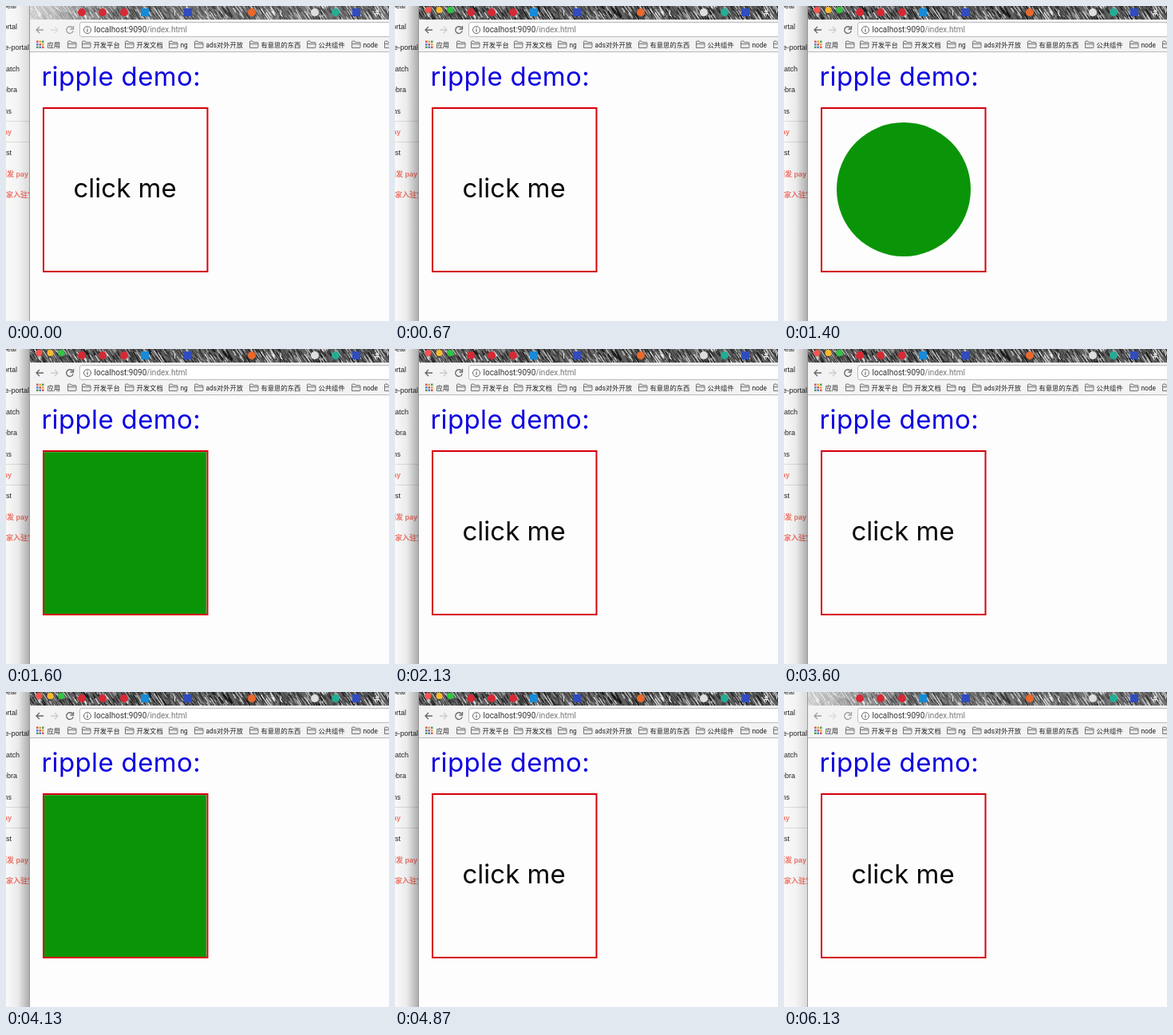
An HTML page for the animation above (6.27 s loop, 480x395 px).

```html
<!DOCTYPE html>
<html lang="zh">
<head>
<meta charset="utf-8">
<title>ripple demo</title>
<style>
html, body { margin: 0; width: 100%; height: 100%; overflow: hidden; background: #fdfdfd; }
svg { display: block; width: 480px; height: 395px; }
text { font-family: Roboto, "Noto Sans CJK SC", "Noto Sans CJK", sans-serif; white-space: pre; }
.side text { font: 9px "Liberation Sans", "Noto Sans CJK SC", "Noto Sans CJK", sans-serif; fill: #222; }
.side .hot { fill: #f2776b; font-weight: 700; }
.url { font-size: 10px; fill: #333; }
.marks text { font-size: 8.3px; fill: #222; }
.big { font: 400 33px Inter, Lato, sans-serif; }
.big.title { letter-spacing: .35px; fill: #1004e0; }
.big.label { fill: #0a0a0a; }
</style>
</head>
<body>
<svg viewBox="0 0 480 395" xmlns="http://www.w3.org/2000/svg">
  <defs>
    <linearGradient id="shade">
      <stop offset="0" stop-color="#000" stop-opacity="0"/>
      <stop offset=".5" stop-color="#000" stop-opacity=".06"/>
      <stop offset="1" stop-color="#000" stop-opacity=".32"/>
    </linearGradient>
    <linearGradient id="fade">
      <stop offset="0" stop-color="#fff" stop-opacity=".75"/>
      <stop offset=".12" stop-color="#fff" stop-opacity=".45"/>
      <stop offset=".25" stop-color="#fff" stop-opacity=".15"/>
      <stop offset="1" stop-color="#fff" stop-opacity=".12"/>
    </linearGradient>
    <clipPath id="strip"><path d="M30 0H480V17H30Z"/></clipPath>
    <clipPath id="inner"><path d="M48 129H251.500V332H48Z"/></clipPath>
    <g id="folder" fill="none" stroke="#777">
      <path d="M.5 9V1.500Q.5 .5 1.500 .5H4L5 2H10Q11 2 11 3V8Q11 9 10 9Z" fill="#e6e6e6"/>
      <path d="M.5 4H11"/>
    </g>
  </defs>

  <rect width="30" height="395" fill="#f9f9f9"/>
  <path d="M0 144.500H30M0 170.500H30" stroke="#ddd"/>
  <g class="side" id="side"></g>
  <rect id="shadow" width="30" height="395" fill="url(#shade)"/>

  <rect x="30" width="450" height="395" fill="#fdfdfd"/>
  <g clip-path="url(#strip)">
    <rect x="30" width="450" height="17" fill="#606060"/>
    <g id="streaks" fill="none"></g>
    <rect id="haze" x="30" width="450" height="17" fill="url(#fade)"/>
    <g id="icons"></g>
    <text x="462" y="12" font-size="10" font-weight="700" fill="#eee">#</text>
    <path d="M211.500 5V12M344.500 5V12M478.500 5V9" stroke="#ddd"/>
  </g>
  <g id="lights">
    <circle cx="41.500" cy="5" r="4" fill="#f8544d"/>
    <circle cx="55.500" cy="5" r="4" fill="#f8b92f"/>
    <circle cx="69.500" cy="5" r="4" fill="#2fc641"/>
  </g>

  <rect x="30" y="17" width="450" height="41" fill="#f3f3f3"/>
  <path d="M30 57.500H480" stroke="#b9b9b9"/>
  <path d="M29.500 0V395" stroke="#999"/>
  <g id="nav" fill="none" stroke="#666" stroke-width="1.300">
    <path d="M47 30H38M42 26L38 30L42 34"/>
    <path d="M56 30H65M61 26L65 30L61 34" stroke="#ccc"/>
    <path d="M83.500 27.500A4.300 4.300 0 1 0 84.200 31.200M84.500 25V29H80.500"/>
  </g>
  <rect x="92.500" y="20.500" width="400" height="18" rx="2.500" fill="#fff" stroke="#bbb"/>
  <circle cx="102" cy="30" r="4.500" fill="none" stroke="#666"/>
  <path d="M102 29V32.500M102 27V28" stroke="#666" stroke-width="1.200"/>
  <text class="url" x="110.500" y="33">localhost:9090<tspan fill="#777">/index.html</tspan></text>
  <g class="marks" id="marks"></g>

  <text class="big title" x="44.500" y="100">ripple demo:</text>
  <text class="big label" x="84.500" y="240">click me</text>
  <g clip-path="url(#inner)"><circle id="ripple" cx="150" cy="230" fill="#0a9508"/></g>
  <rect x="47" y="128" width="205.500" height="205" fill="none" stroke="#d6000c" stroke-width="2"/>
  <path id="edge" d="M48 129.500H251V332" fill="none" stroke="#fff" stroke-opacity=".4" stroke-dasharray="1 1"/>
</svg>
<script>
const LOOP = 6270, FOCUS = [300, 5560];
const CLICKS = [1300, 3670], GROW = 300, LIFE = 690, REACH = 150;
const $ = id => document.getElementById(id);

function add(parent, tag, attrs, text) {
  const el = document.createElementNS("http://www.w3.org/2000/svg", tag);
  for (const k in attrs) el.setAttribute(k, attrs[k]);
  if (text) el.textContent = text;
  return $(parent).appendChild(el);
}

// Sidebar labels: text, right edge, red
[["bear", 14], ["ortal", 14], ["re-portal", 29], ["atch", 17], ["ebra", 14],
 ["ns", 7], ["pay", 7, 1], ["st", 7], ["颁发 pay", 28, 1], ["商家入驻宝", 36, 1]]
  .forEach(([s, x, hot], i) => add("side", "text",
    { x, y: 2.5 + i * 26.4, "text-anchor": "end", class: hot ? "hot" : "" }, s));

// Pencil-stroke tab strip
let seed = 7;
const rnd = () => (seed = seed * 16807 % 2147483647) / 2147483647;
for (let i = 0; i < 900; i++) {
  const x = 20 + rnd() * 460, y = rnd() * 22 - 6, n = 3 + rnd() * 8;
  const c = rnd() < .6 ? 10 + rnd() * 45 : 170 + rnd() * 85;
  add("streaks", "path", {
    d: `M${x} ${y}l${n * .65} ${n}`,
    stroke: `rgb(${c},${c},${c})`, "stroke-width": .5 + rnd() * .7
  });
}

// Tab icons
for (const [x, fill] of [[95, "#d42a35"], [121, "#d42a35"], [148, "#d42a35"],
  [308, "#e9682c"], [387, "#dedede"], [413, "#24ad94"]])
  add("icons", "circle", { cx: x, cy: 8, r: 5, fill });
for (const [x, fill] of [[174, "#168bd8"], [228, "#304cc0"], [439, "#304cc0"]])
  add("icons", "rect", { x: x - 5, y: 3, width: 10, height: 10, fill });

// Bookmarks bar
const dots = ["#d8574c", "#e0a63e", "#4c9b5a", "#4d80d0"];
for (let i = 0; i < 9; i++)
  add("marks", "rect", { x: 38 + i % 3 * 3.5, y: 43.5 + (i / 3 | 0) * 3.5,
    width: 2.5, height: 2.5, fill: dots[i % 4] });
add("marks", "text", { x: 51.5, y: 51.5 }, "应用");
for (const [x, s] of [[77, ""], [95, "开发平台"], [149, "开发文档"], [204, "ng"],
  [236, "ads对外开放"], [305, "有意思的东西"], [377, "公共组件"], [433, "node"], [474, ""]]) {
  add("marks", "use", { href: "#folder", x, y: 43.5 });
  add("marks", "text", { x: x + 14.5, y: 51.5 }, s);
}

function draw(t) {
  const active = t >= FOCUS[0] && t < FOCUS[1];
  $("lights").style.opacity = active ? 1 : 0;
  $("haze").style.opacity = active ? 0 : 1;
  $("shadow").style.opacity = active ? 1 : .4;
  $("nav").style.opacity = active ? 1 : .6;

  const start = CLICKS.find(c => t >= c && t < c + LIFE);
  const p = start === undefined ? 0 : Math.min(1, (t - start) / GROW);
  $("ripple").setAttribute("r", REACH * p * (2 - p));
  $("edge").style.opacity = p === 1 ? 1 : 0;
}

const begin = performance.now();
function tick() {
  draw((performance.now() - begin) % LOOP);
  requestAnimationFrame(tick);
}
tick();
</script>
</body>
</html>
```
